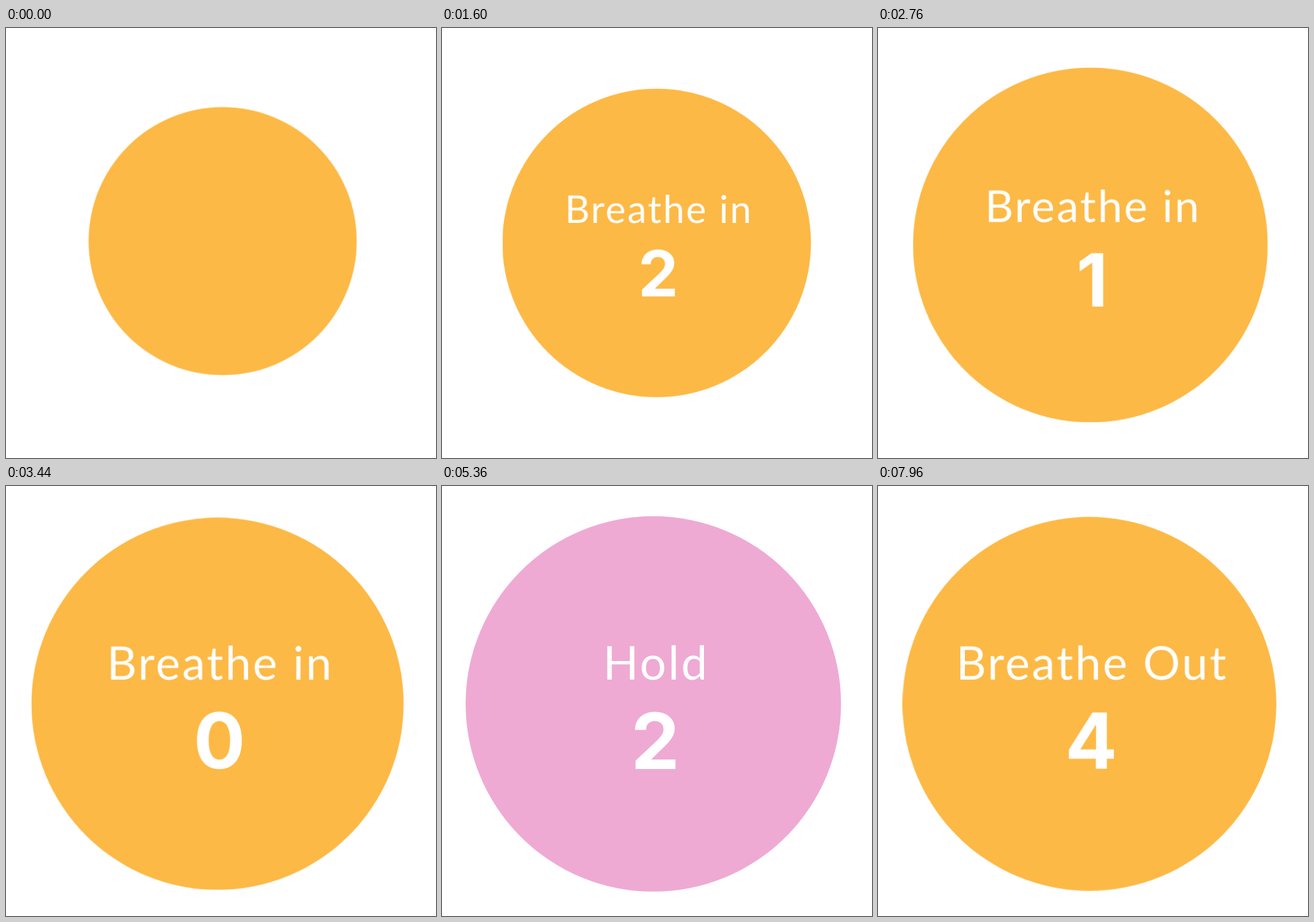
Recreate the animation shown at these times as an HTML page. Size 673 by 673 pixels, loop 8000 ms.

```html
<!DOCTYPE html>
<html lang="en">
<head>
<meta charset="utf-8">
<title>Breathing exercise</title>
<style>
  html, body { margin: 0; width: 100%; height: 100%; overflow: hidden; background: #fff; }
  svg { display: block; width: 100%; height: 100%; }

  /* Each breathing phase takes 3840 ms, 48% of the loop. */
  #bubble {
    transform-origin: 360px 314.8px;
    animation: breathe 8s infinite;
  }
  #disc { animation: tint 8s linear infinite; }

  text { fill: #fff; text-anchor: middle; text-rendering: geometricPrecision; }
  .word { font: 400 73px Lato, sans-serif; letter-spacing: 3px; }
  .count { font: 700 121.5px Inter, sans-serif; }
  .word, .count { opacity: 0; animation: 8s step-end infinite; }

  .in { animation-name: in; }
  .hold { animation-name: hold; }
  .out { animation-name: out; }
  .n4 { animation-name: four; }
  .n3 { animation-name: three; }
  .n2 { animation-name: two; }
  .n1 { animation-name: one; }
  .n0 { animation-name: zero; }

  @keyframes breathe {
    0% { transform: scale(.7143); animation-timing-function: cubic-bezier(.3333, 0, .6667, 1); }
    48% { transform: scale(1); animation-timing-function: linear; }
    96% { transform: scale(1); animation-timing-function: cubic-bezier(.3333, 0, .6667, .3333); }
    100% { transform: scale(.9944); }
  }
  @keyframes tint {
    0%, 48% { fill: #fdb945; }
    56.5%, 90% { fill: #eeaad3; }
    98%, 100% { fill: #fdb945; }
  }

  @keyframes in { 0%, 48%, 100% { opacity: 0; } .5% { opacity: 1; } }
  @keyframes hold { 0%, 96%, 100% { opacity: 0; } 48% { opacity: 1; } }
  @keyframes out { 0% { opacity: 0; } 96%, 100% { opacity: 1; } }

  @keyframes four { 0%, 8.5%, 56.5% { opacity: 0; } .5%, 48%, 96%, 100% { opacity: 1; } }
  @keyframes three { 0%, 19%, 67%, 100% { opacity: 0; } 8.5%, 56.5% { opacity: 1; } }
  @keyframes two { 0%, 29.5%, 77.5%, 100% { opacity: 0; } 19%, 67% { opacity: 1; } }
  @keyframes one { 0%, 40%, 88%, 100% { opacity: 0; } 29.5%, 77.5% { opacity: 1; } }
  @keyframes zero { 0%, 48%, 96%, 100% { opacity: 0; } 40%, 88% { opacity: 1; } }
</style>
</head>
<body>
<svg viewBox="0 0 673 673">
  <g id="bubble">
    <circle id="disc" cx="330.75" cy="341.1" r="293.75" fill="#fdb945"/>
    <text class="word in" x="335" y="302.7">Breathe in</text>
    <text class="word hold" x="335" y="302.7">Hold</text>
    <text class="word out" x="335" y="302.7">Breathe Out</text>
    <text class="count n4" x="333.7" y="442.5">4</text>
    <text class="count n3" x="333.7" y="442.5">3</text>
    <text class="count n2" x="333.7" y="442.5">2</text>
    <text class="count n1" x="333.7" y="442.5">1</text>
    <text class="count n0" x="333.7" y="442.5">0</text>
  </g>
</svg>
</body>
</html>
```
